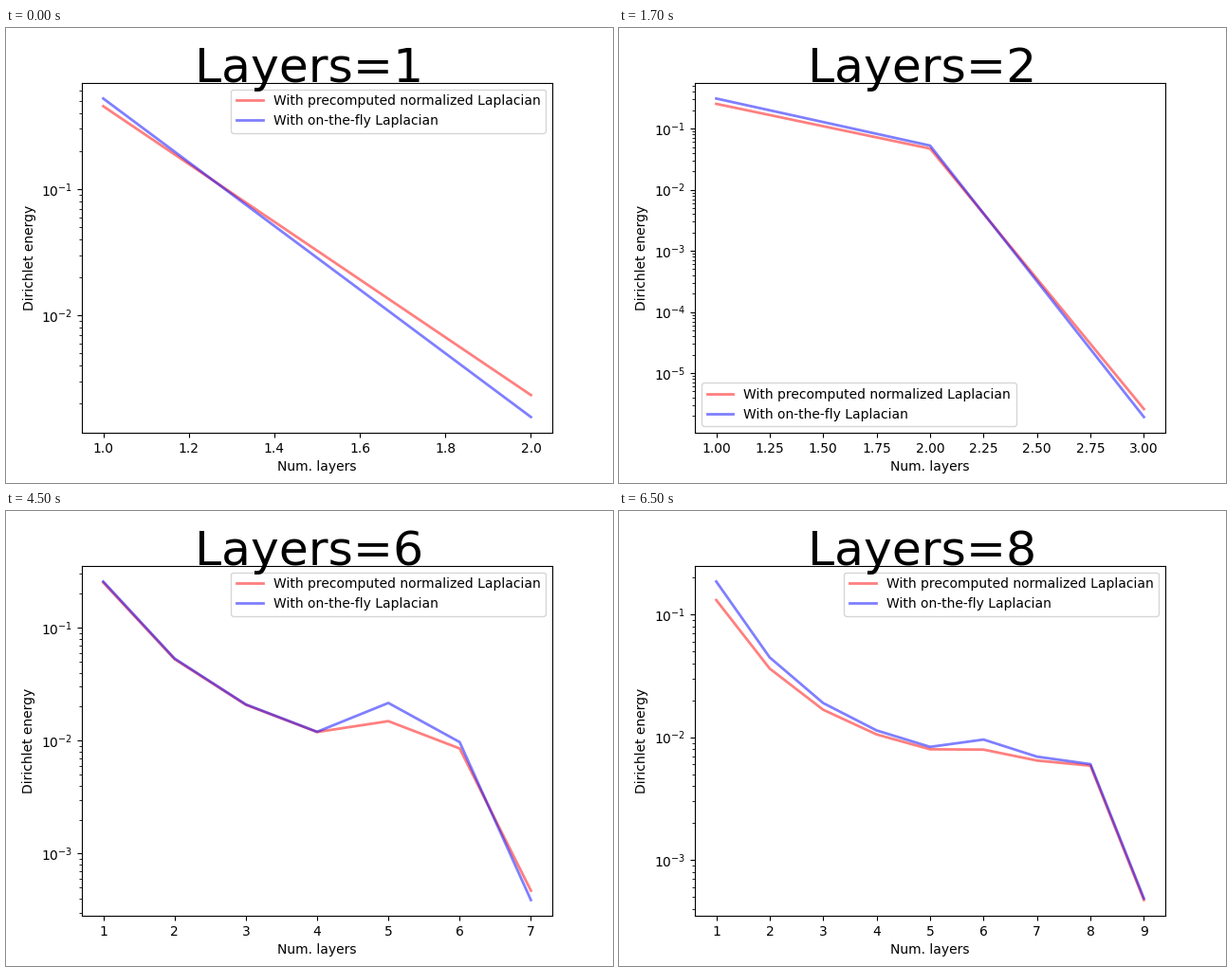
Animation, 640 px wide and 480 px high, one loop 8000 ms. Source, as a matplotlib script:

```python
import numpy as np
import matplotlib.pyplot as plt
from matplotlib.animation import FuncAnimation

STEP_MS = 500
LOOP_MS = 8000
FIRST_HOLD_MS, HOLD_MS = 500, 2000
LAYER_COUNTS = (1, 2, 4, 6, 8)
LOG_FLOOR = -2.28

SERIES = {
    "red": "With precomputed normalized Laplacian",
    "blue": "With on-the-fly Laplacian",
}

# Per model depth: log10 energy at the first and last layer, size of the rebound.
CURVES = {
    1: {"red": (-0.343, -2.630, 0), "blue": (-0.282, -2.804, 0)},
    2: {"red": (-0.595, -5.588, 0), "blue": (-0.508, -5.719, 0)},
    4: {"red": (-0.806, -3.138, 0.11), "blue": (-0.625, -3.315, 0.20)},
    6: {"red": (-0.600, -3.328, 0.24), "blue": (-0.591, -3.411, 0.40)},
    8: {"red": (-0.883, -3.326, 0.07), "blue": (-0.732, -3.313, 0.14)},
}

fig, ax = plt.subplots(figsize=(6.4, 4.8), dpi=100)
title = fig.text(0.499, 1 - 57 / 480, "", fontsize=36.3, ha="center")


def energy(count, first, last, rebound):
    """Decay towards a floor, rebound at one layer, then drop at the last."""
    layer = np.arange(1, count + 2)
    rate = 0.49 + 0.16 / count
    log_energy = LOG_FLOOR + (first - LOG_FLOOR) * np.exp(-rate * (layer - 1))
    since_peak = layer - (count // 2 + 2)
    log_energy += np.where(since_peak >= 0, rebound * 0.35 ** np.abs(since_peak), 0)
    log_energy[-1] = last
    return layer, 10 ** log_energy


def draw(frame):
    elapsed = frame * STEP_MS - FIRST_HOLD_MS
    count = LAYER_COUNTS[elapsed // HOLD_MS + 1]
    ax.clear()
    for color, label in SERIES.items():
        ax.plot(*energy(count, *CURVES[count][color]), color=color,
                linewidth=2, alpha=0.5, label=label)
    ax.set_yscale("log")
    ax.set_xlabel("Num. layers")
    ax.set_ylabel("Dirichlet energy")
    ax.legend(loc="lower left" if count == 2 else "upper right")
    title.set_text(f"Layers={count}")


anim = FuncAnimation(fig, draw, frames=LOOP_MS // STEP_MS,
                     interval=STEP_MS, repeat=True, repeat_delay=0)
plt.show()
```
